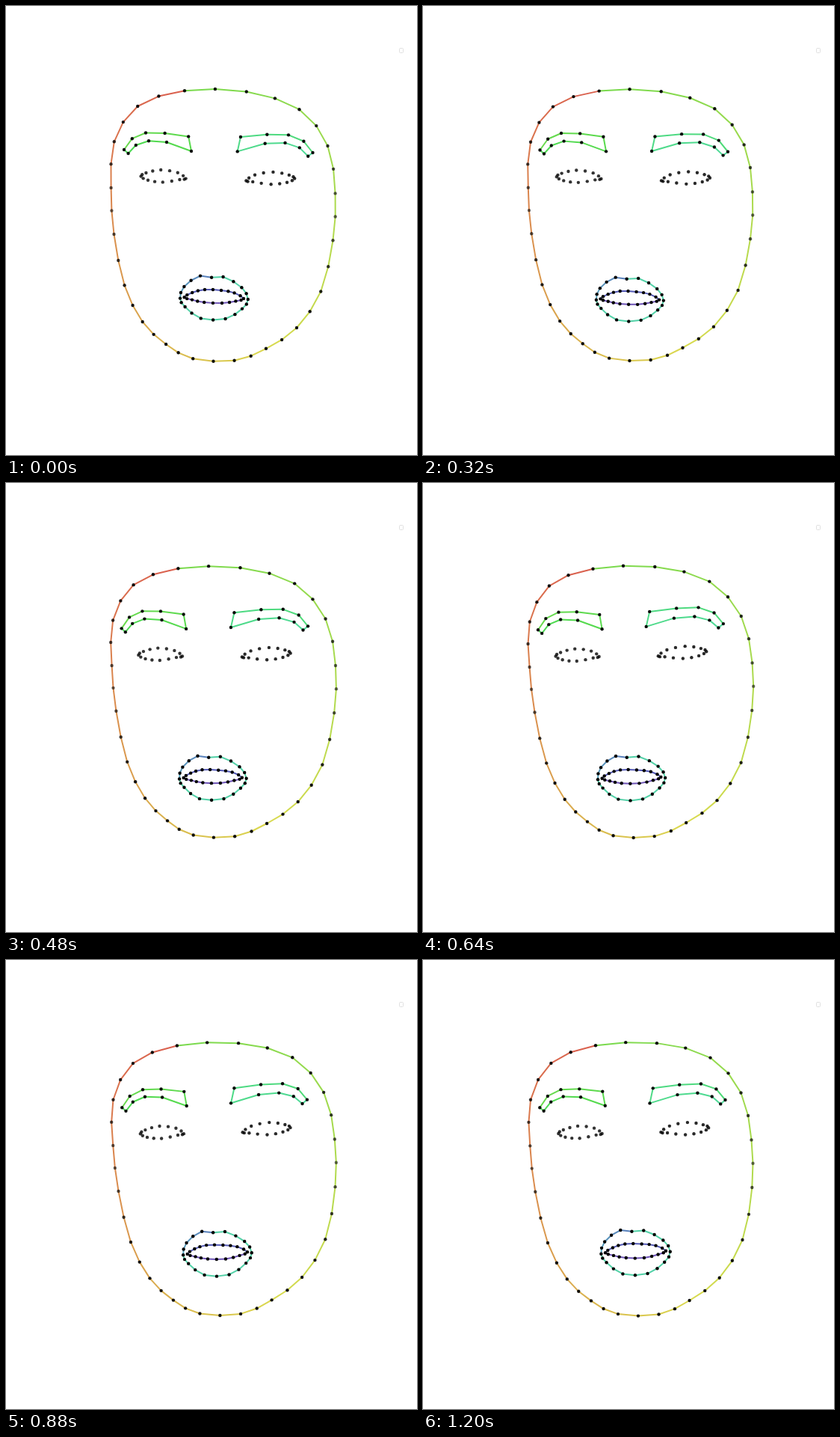
An HTML page with a canvas that plays this animation: 550x600 px, repeating every 1.28 s.

```html
<!DOCTYPE html>
<html lang="en">
<head>
<meta charset="utf-8">
<title>Face mesh contours</title>
<style>
  html, body { margin: 0; width: 100%; height: 100%; overflow: hidden; background: #fff; }
  canvas { display: block; width: 550px; height: 600px; }
</style>
</head>
<body>
<canvas id="stage"></canvas>
<script>
const STEP = 80, STEPS = 16;

// Step, amount of the "turn" shift, amount of the "settle" shift
const POSES = [
  [0, 0, 0], [4, .5, -.3], [6, 1, -.36], [8, 1, 0],
  [11, .4, .69], [13, .05, .94], [15, 0, 1]
];

const canvas = document.getElementById('stage');
const ctx = canvas.getContext('2d');
const ratio = window.devicePixelRatio || 1;
canvas.width = 550 * ratio;
canvas.height = 600 * ratio;
ctx.scale(ratio, ratio);

const pairs = list => Array.from({ length: list.length / 2 }, (_, i) => list.slice(2 * i, 2 * i + 2));
const hsl = (h, s = 65, l = 58) => `hsl(${h} ${s}% ${l}%)`;

function hermite(a, b, ma, mb, u) {
  const v = u * u, w = v * u;
  return (2 * w - 3 * v + 1) * a + (w - 2 * v + u) * ma + (3 * v - 2 * w) * b + (w - v) * mb;
}

// Resample a closed loop to n points along a smooth curve.
function spread(loop, n) {
  const m = loop.length;
  return Array.from({ length: n }, (_, i) => {
    const f = i * m / n, k = Math.floor(f);
    return [0, 1].map(c => {
      const at = j => loop[(j + m) % m][c];
      return hermite(at(k), at(k + 1), (at(k + 1) - at(k - 1)) / 2, (at(k + 2) - at(k)) / 2, f - k);
    });
  });
}

const parts = [];
function part(rest, n, turn, settle, alpha, color) {
  const p = {
    rest: spread(rest, n), alpha, color,
    turn: spread(pairs(turn), n), settle: spread(pairs(settle), n)
  };
  parts.push(p);
  return p;
}

// Oval, counterclockwise from the top
part(pairs([
  239,113.2, 176.2,134, 144.8,181.3, 140.6,242.9, 144.5,305, 158.6,373.3,
  182.7,422, 214.1,452, 250.2,471.2, 305.6,473.8, 348,457.8, 389,430,
  421.3,381.5, 437.5,313.2, 440.6,250.4, 430.5,187, 392.5,138.2, 321.8,114.5
]), 36,
  [-11.5,1.5, -2,4.2, 5,1.5, 7,.8, 4.4,0, 4.2,-3.8, 4.3,-7.7, 0,-10, -9.2,-6.6],
  [-8,1.1, -.8,5.5, 5.8,4.8, 10.1,4.4, 10.8,1.9, 8.6,-2.8, 6.2,-7.5, -1.1,-10, -8,-7.6],
  y => .57 + .35 * Math.min(1, Math.abs(y - 270) / 130), i => hsl(8 + 2.65 * i));

// Brows and eyes, each from the outer corner; the right side mirrors the left.
const brow = pairs([
  158,192, 168.8,177.2, 187,169.5, 212.6,170, 244.2,174.4,
  248,194, 215,182, 191,180.2, 173.8,186, 163.6,197
]);
const eye = pairs([
  180.6,227.6, 187.4,223, 207.2,219, 229.8,222.8,
  240.6,230.6, 232.4,232, 209.8,235.4, 190,232.8
]);
const rightBrow = brow.map(([x, y]) => [410.5 - 1.12 * (x - 158), y + 4 - .04 * (x - 158)]);
const rightEye = eye.map(([x, y]) => [386.2 - 1.08 * (x - 180.6), y + 2.9]);

part(brow, 10, [-4,4.2, -8.4,1.2], [-1.7,5.2, -4.2,.8], () => .92, i => hsl(108 + 1.8 * i));
part(rightBrow, 10, [-8.6,-7.9, -11,-2.5], [-6,-9, -6.2,-3], () => .95, i => hsl(138 + 1.6 * i));
part(eye, 16, [-3,3.9, -5,1.4], [.7,4.4, -1,1.4], () => .8);
part(rightEye, 16, [-7,-5.3, -6.6,-2.2], [-4.1,-6.2, -3,-3.4], () => .84);

// Lips
const lipTurn = [1,5.6, -2.3,4, .4,1.9, .4,4.9];
const lipSettle = [5.4,2.1, 4.3,0, 7,-2.2, 6.8,1.7];
const outer = part(pairs([
  233,390.6, 238.4,375, 260,360.6, 290.6,362, 315.4,376.2,
  323.8,392, 316,404.6, 293.6,418, 260.8,417.4, 239.6,402
]), 20, lipTurn, lipSettle, () => 1,
  i => i < 5 ? hsl(195 + 5 * i, 42, 54) : hsl(160, 58, 57));
outer.rest[5][1] += 3.2; // notch of the upper lip
part(pairs([
  238.6,389.2, 249.2,383, 266,379, 288,380, 305.6,383.4,
  318,391, 307.4,394.4, 289,397, 265.2,396, 249,392.6
]), 20, lipTurn, lipSettle, () => 1, i => hsl(i < 10 ? 236 : 256, 40, 52));

// Both shift amounts at a step, eased through the poses.
function amountsAt(step) {
  const last = POSES.length - 1;
  let k = 0;
  while (k < last - 1 && step >= POSES[k + 1][0]) k++;
  const a = POSES[k], b = POSES[k + 1], span = b[0] - a[0];
  const slope = (j, c) => {
    if (j === 0 || j === last) return 0;
    const p = POSES[j - 1], q = POSES[j + 1];
    return (q[c] - p[c]) / (q[0] - p[0]) * span;
  };
  return [1, 2].map(c => hermite(a[c], b[c], slope(k, c), slope(k + 1, c), (step - a[0]) / span));
}

function drawLines(pts, color) {
  ctx.lineWidth = 2;
  ctx.lineCap = 'round';
  pts.forEach((p, i) => {
    ctx.strokeStyle = color(i);
    ctx.beginPath();
    ctx.moveTo(...p);
    ctx.lineTo(...pts[(i + 1) % pts.length]);
    ctx.stroke();
  });
}

function drawDots(pts, alpha) {
  for (const [x, y] of pts) {
    ctx.fillStyle = `rgba(0, 0, 0, ${alpha(y)})`;
    ctx.beginPath();
    ctx.arc(x, y, 2.2, 0, Math.PI * 2);
    ctx.fill();
  }
}

function draw(step) {
  ctx.fillStyle = '#fff';
  ctx.fillRect(0, 0, 550, 600);
  ctx.strokeStyle = '#e0e0e0';
  ctx.lineWidth = 1;
  ctx.beginPath();
  ctx.roundRect(526.5, 56.5, 5, 6, 1);
  ctx.stroke();

  const [t, s] = amountsAt(step);
  const loops = parts.map(p => p.rest.map((pt, i) =>
    pt.map((v, c) => v + t * p.turn[i][c] + s * p.settle[i][c])));
  parts.forEach((p, i) => p.color && drawLines(loops[i], p.color));
  parts.forEach((p, i) => drawDots(loops[i], p.alpha));
}

function tick() {
  draw(Math.floor(performance.now() / STEP) % STEPS);
  requestAnimationFrame(tick);
}
tick();
</script>
</body>
</html>
```
